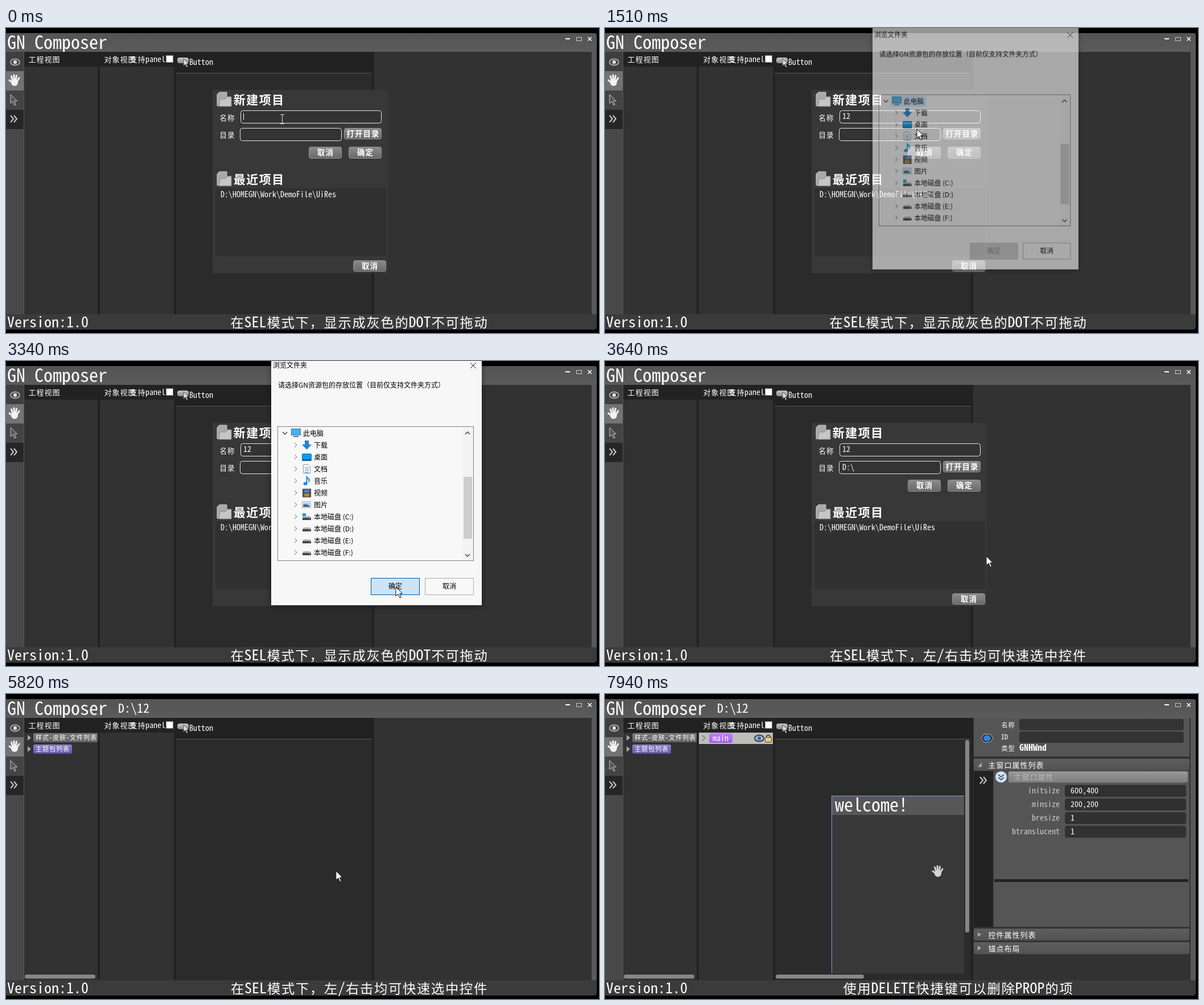
An HTML page with a canvas for the animation above (8 s loop, 1042 by 537 pixels).

```html
<!DOCTYPE html>
<html lang="zh">
<head>
<meta charset="utf-8">
<title>GN Composer</title>
<style>
html, body { margin: 0; width: 100%; height: 100%; overflow: hidden; background: #000; }
canvas { display: block; }
</style>
</head>
<body>
<canvas id="stage" width="1042" height="537"></canvas>
<script>
const W = 1042, H = 537, LOOP = 8000;
const SANS = '"Noto Sans CJK SC", "Noto Sans CJK JP", sans-serif';
const MONO = '"Noto Sans Mono CJK SC", "Noto Sans Mono CJK JP", "Liberation Mono", monospace';
const main = document.getElementById('stage').getContext('2d');
const layer = document.createElement('canvas');
const LIFT = 20; // part of the folder window above the stage
layer.width = W;
layer.height = H + LIFT;
let g = main, now = 0, mouse = null;

main.font = '100px ' + MONO;
const advance = main.measureText('0').width / 100;

// The screen updates in steps: [start, interval, count]
const ticks = [
  [0, 0, 1], [140, 0, 1], [420, 0, 1], [700, 135, 7], [1630, 0, 1],
  [1750, 132.85, 8], [2800, 135, 5], [3490, 150, 3], [3940, 135, 7], [4900, 0, 1],
  [5050, 148.57, 8], [6560, 150, 3], [7140, 133.33, 7]
].flatMap(([start, gap, n]) => Array.from({ length: n }, (_, i) => Math.floor(start + i * gap)));

// Pointer path: time, x, y
const path = [
  [700, 490, 163], [970, 600, 184], [1105, 624, 188], [1240, 624, 188], [1375, 605, 184],
  [1510, 548, 178], [1630, 515, 178], [1750, 502, 178], [1950, 510, 200], [2281, 560, 293],
  [2800, 568, 299], [3205, 682, 396], [3340, 685, 398], [3490, 685, 398], [3940, 640, 235],
  [4075, 630, 225], [4900, 630, 225], [5500, 582, 314], [5790, 580, 312], [6090, 556, 245],
  [6860, 556, 245], [7140, 560, 258], [7400, 580, 308], [7930, 585, 313]
];

function pointerAt(t) {
  if (t < 140) return { x: 485, y: 160 };
  if (t < 700) return null;
  const i = path.findIndex(k => k[0] > t);
  if (i < 0) return { x: 585, y: 313 };
  const [t0, x0, y0] = path[i - 1], [t1, x1, y1] = path[i];
  const p = (t - t0) / (t1 - t0);
  return { x: x0 + (x1 - x0) * p, y: y0 + (y1 - y0) * p };
}

const inside = (x, y, w, h) =>
  mouse && mouse.x >= x && mouse.x < x + w && mouse.y >= y && mouse.y < y + h;

function rect(x, y, w, h, fill) {
  g.fillStyle = fill;
  g.fillRect(x, y, w, h);
}

function round(x, y, w, h, r, fill, stroke) {
  g.beginPath();
  g.roundRect(x, y, w, h, r);
  if (fill) { g.fillStyle = fill; g.fill(); }
  if (stroke) { g.strokeStyle = stroke; g.lineWidth = 1; g.stroke(); }
}

function line(points, color, width = 1) {
  g.beginPath();
  points.forEach(([x, y]) => g.lineTo(x, y));
  g.strokeStyle = color;
  g.lineWidth = width;
  g.stroke();
}

function poly(points, fill, stroke) {
  g.beginPath();
  points.forEach(([x, y]) => g.lineTo(x, y));
  g.closePath();
  if (fill) { g.fillStyle = fill; g.fill(); }
  if (stroke) { g.strokeStyle = stroke; g.lineWidth = 1; g.stroke(); }
}

function oval(x, y, rx, ry, fill, stroke, width = 1) {
  g.beginPath();
  g.ellipse(x, y, rx, ry, 0, 0, Math.PI * 2);
  if (fill) { g.fillStyle = fill; g.fill(); }
  if (stroke) { g.strokeStyle = stroke; g.lineWidth = width; g.stroke(); }
}

function shade(y, h, top, bottom) {
  const s = g.createLinearGradient(0, y, 0, y + h);
  s.addColorStop(0, top);
  s.addColorStop(1, bottom);
  return s;
}

// Half-width Latin next to full-width Chinese; align: 0 left, .5 centre, 1 right
function put(str, x, y, size, color = '#fff', align = 0, weight = 400) {
  const half = Math.ceil(size / 2);
  const runs = str.match(/[\x20-\x7e]+|[^\x20-\x7e]+/g).map(s => {
    const latin = s.charCodeAt(0) < 127;
    return { s, latin, w: s.length * (latin ? half : size) };
  });
  x -= align * runs.reduce((sum, r) => sum + r.w, 0);
  g.fillStyle = color;
  for (const r of runs) {
    // Chinese glyphs sit in their cell with a little air
    const air = r.latin ? 0 : size * .07;
    g.font = `${weight} ${r.latin ? half / advance : size - air}px ${r.latin ? MONO : SANS}`;
    g.letterSpacing = air + 'px';
    g.fillText(r.s, x + air / 2, y);
    x += r.w;
  }
  g.letterSpacing = '0px';
}

function label(str, x, y, color = '#000', align = 'left') {
  g.font = '12px ' + SANS;
  g.textAlign = align;
  g.fillStyle = color;
  g.fillText(str, x, y);
  g.textAlign = 'left';
}

function button(str, x, y, w, h, size = 14.5) {
  const hot = inside(x, y, w, h);
  round(x + .5, y + .5, w - 1, h - 1, 3, shade(y, h, hot ? '#a2a2a2' : '#8c8c8c', hot ? '#808080' : '#686868'), '#909090');
  put(str, x + w / 2, y + h / 2 + size * .34, size, '#fff', .5, 700);
}

function arrow(x, y, fill, stroke, k = 1) {
  const shape = [[0, 0], [0, 16], [4, 12.5], [7, 19], [9.5, 18], [6.5, 11.5], [11.5, 11.5]];
  poly(shape.map(([a, b]) => [x + a * k, y + b * k]), fill, stroke);
}

function hand(x, y, color) {
  g.lineCap = 'round';
  for (const [a, b] of [[-9, 0], [-5.5, -7], [-1, -9], [3.5, -8], [8, -4]])
    line([[x + a * .4, y + 4], [x + a, y + b]], color, 3);
  g.lineCap = 'butt';
  oval(x, y + 4, 6, 6, color);
}

function eye(x, y, color, pupil) {
  oval(x, y, 8, 5.5, null, color, 2);
  oval(x, y, 3.2, 3.2, pupil);
}

function chevrons(x, y, color) {
  for (const d of [-5, 1]) line([[x + d, y - 6], [x + d + 5, y], [x + d, y + 6]], color, 2);
}

function folder(x, y) {
  poly([[x, y + 4], [x + 4, y], [x + 17, y], [x + 17, y + 24], [x, y + 24]], '#a9a9a9', '#ccc');
  poly([[x + 5, y + 12], [x + 15, y + 12], [x + 18, y + 8], [x + 25, y + 8], [x + 25, y + 25], [x + 3, y + 25]], '#c6c6c6', '#8b8b8b');
}

function frame() {
  rect(0, 0, W, H, '#000');
  round(0, 9, 1038, 522, [0, 4, 5, 0], '#323232');
  round(0, 9, 1038, 33, [0, 4, 0, 0], shade(9, 33, '#545454', '#5b5b5b'));
  rect(1029, 42, 9, 462, '#595959');
  round(0, 504, 1038, 27, [0, 0, 5, 0], '#3b3b3b');
  put('GN Composer', 2, 37, 32);
  if (now >= 5790) put('D:\\12', 197, 33, 22);
  rect(983, 18, 8, 2, '#fff');
  g.strokeStyle = '#c8c8c8';
  g.lineWidth = 1;
  g.strokeRect(1002.5, 16.5, 9, 6);
  line([[1022.5, 16], [1029, 22.5]], '#fff', 1.5);
  line([[1029, 16], [1022.5, 22.5]], '#fff', 1.5);

  rect(0, 42, 32, 462, '#484848');
  rect(0, 42, 31, 34, '#3f3f3f');
  rect(0, 76, 31, 34, '#737373');
  rect(0, 110, 31, 34, '#444');
  rect(0, 144, 31, 34, '#262626');
  rect(31, 42, 1, 462, '#585858');
  eye(16, 60, '#aaa', '#ddd');
  hand(15, 92, '#f2f2f2');
  arrow(8, 117, '#555', '#c4c4c4');
  chevrons(13, 160, '#c8c8c8');

  rect(32, 42, 614, 26, '#222');
  for (const x of [161, 295, 643]) rect(x, 42, 4, 462, '#222');
  rect(299, 42, 347, 37, '#222');
  rect(299, 79, 344, 1, '#585858');
  rect(299, 80, 344, 424, '#2b2b2b');
  put('工程视图', 39, 60, 14);
  put('对象视图', 172, 60, 14);
  put('支持panel', 217, 60, 14);
  rect(281, 48, 13, 13, '#888');
  rect(282, 49, 11, 11, '#fff');
  round(301, 52, 20, 10, 4, shade(52, 10, '#c4c4c4', '#8e8e8e'));
  arrow(312, 54, '#ddd', '#555', .78);
  put('Button', 322, 65, 14);

  put('Version:1.0', 2, 527, 25);
  const tip = now < 3640 ? '在SEL模式下，显示成灰色的DOT不可拖动'
    : now < 7670 ? '在SEL模式下，左/右击均可快速选中控件'
    : '使用DELETE快捷键可以删除PROP的项';
  put(tip, 620, 527, 25, '#fff', .5);
}

function startPanel() {
  rect(363, 109, 308, 323, '#383838');
  folder(371, 113);
  put('新建项目', 399, 133.5, 22.5, '#fff', 0, 700);
  put('名称', 375, 163, 13.5);
  put('目录', 375, 193, 13.5);
  round(412.5, 145.5, 247, 22, 4, '#333', '#e6e6e6');
  round(411.5, 176.5, 178, 22, 4, '#333', '#e6e6e6');
  const typed = now < 140 ? '' : now < 420 ? '1' : '12';
  if (typed) put(typed, 417, 160, 14);
  if (now < 1240) rect(417 + typed.length * 7, 150, 1, 12, '#fff');
  if (now >= 3640) put('D:\\', 417, 192, 14);
  button('打开目录', 594, 176, 66, 20);
  button('取消', 532, 209, 58, 21);
  button('确定', 602, 209, 58, 21);
  folder(371, 253);
  put('最近项目', 399, 274, 22.5, '#fff', 0, 700);
  rect(368, 282, 300, 120, '#313131');
  put('D:\\HOMEGN\\Work\\DemoFile\\UiRes', 377, 298, 14);
  button('取消', 610, 409, 58, 20);
}

const drive = y => {
  poly([[523, y], [534, y], [536, y + 3], [521, y + 3]], '#b5b5b5');
  rect(521, y + 3, 15, 4, '#444');
  rect(532, y + 4, 2, 1, '#7ee07e');
};

const icons = [
  y => poly([[525, y - 8], [532, y - 8], [532, y - 1], [537, y - 1], [528.5, y + 8], [520, y - 1], [525, y - 1]], '#2183d6'),
  y => { round(520.5, y - 5.5, 16, 12, 1, '#0b9af0', '#0a69ad'); rect(521, y + 4, 15, 2, '#1c5d91'); },
  y => {
    poly([[522.5, y - 7.5], [531, y - 7.5], [534.5, y - 4], [534.5, y + 7.5], [522.5, y + 7.5]], '#fff', '#8a949c');
    for (let i = 0; i < 4; i++) rect(525, y - 3 + i * 3, 7, 1, '#3f8fc6');
  },
  y => {
    line([[528.5, y + 5], [528.5, y - 7], [533, y - 2], [532, y + 2]], '#1588dc', 2);
    oval(526, y + 5, 3.5, 2.8, '#1588dc');
  },
  y => {
    rect(521, y - 7, 15, 15, '#333');
    for (let i = 0; i < 5; i++) { rect(522, y - 6 + i * 3, 1, 1, '#eee'); rect(534, y - 6 + i * 3, 1, 1, '#eee'); }
    rect(524, y - 6, 9, 6, '#4f7fc0');
    rect(524, y + 1, 9, 6, '#a7824c');
  },
  y => {
    round(520.5, y - 5.5, 15, 11, 0, '#fff', '#a0a8ae');
    rect(522, y - 4, 12, 8, '#a9d3ee');
    poly([[522, y + 4], [522, y], [527, y - 1], [534, y + 2], [534, y + 4]], '#39678d');
  },
  y => { rect(521, y - 6, 6, 6, '#18a0e8'); drive(y - 1); },
  y => drive(y - 2), y => drive(y - 2), y => drive(y - 2)
];
const places = ['下载', '桌面', '文档', '音乐', '视频', '图片', ...[...'CDEF'].map(c => `本地磁盘 (${c}:)`)];

function winButton(str, x, state) {
  const [fill, edge, ink] = {
    off: ['#ccc', '#bfbfbf', '#838383'],
    on: ['#f8f8f8', '#adadad', '#000'],
    hot: ['#cce4f7', '#005499', '#000']
  }[state];
  rect(x, 382, 86, 30, edge);
  rect(x + 1, 383, 84, 28, fill);
  label(str, x + 43, 401, ink, 'center');
}

function browser() {
  rect(466, -LIFT, 370, 430 + LIFT, '#f7f7f7');
  label('浏览文件夹', 469, 12);
  line([[816, 3], [826, 13]], '#222');
  line([[826, 3], [816, 13]], '#222');
  label('请选择GN资源包的存放位置（目前仅支持文件夹方式）', 478, 47);
  rect(477, 115, 345, 237, '#828282');
  rect(478, 116, 343, 235, '#f8f8f8');
  rect(803, 116, 18, 235, '#f3f3f3');
  rect(804, 204, 15, 109, '#cdcdcd');
  line([[807, 129], [811, 125], [815, 129]], '#505050', 1.7);
  line([[807, 340], [811, 344], [815, 340]], '#505050', 1.7);

  if (now < 2410) rect(499, 117, 63, 20, '#cce8ff');
  else if (now < 3340) rect(519, 285, 97, 20, '#cce8ff');
  line([[486, 125], [490, 129], [494, 125]], '#404040', 1.5);
  round(501.5, 119.5, 16, 11, 0, '#43b4ee', '#39749b');
  rect(505, 132, 9, 2, '#5a7f97');
  label('此电脑', 522, 131.5);
  places.forEach((name, i) => {
    const y = 148 + i * 21;
    line([[507, y - 4], [511, y], [507, y + 4]], '#a6a6a6', 1.4);
    icons[i](y);
    label(name, 541, y + 4.5);
  });
  winButton('确定', 641, now < 2410 ? 'off' : inside(641, 382, 86, 30) ? 'hot' : 'on');
  winButton('取消', 736, inside(736, 382, 86, 30) ? 'hot' : 'on');
}

// Opens and closes with a fade and a slight zoom
function showBrowser() {
  if (now < 1375 || now >= 3640) return;
  const [alpha, zoom] = now < 1510 ? [.2, .95] : now < 1630 ? [.6, .978]
    : now < 1750 ? [.93, .996] : now < 3490 ? [1, 1] : [.45, .965];
  g = layer.getContext('2d');
  g.clearRect(0, 0, W, layer.height);
  g.save();
  g.translate(0, LIFT);
  browser();
  g.restore();
  g = main;
  g.save();
  g.translate(650.5, 205);
  g.scale(zoom, zoom);
  g.translate(-650.5, -205);
  g.globalAlpha = alpha;
  g.save();
  // Shadow only around the window, so it does not darken what shows through
  g.beginPath();
  g.rect(-W, -H, 3 * W, 3 * H);
  g.rect(466, -LIFT, 370, 430 + LIFT);
  g.clip('evenodd');
  g.shadowColor = 'rgba(0,0,0,.45)';
  g.shadowBlur = 10;
  g.shadowOffsetY = 2;
  rect(466, -LIFT, 370, 430 + LIFT, '#000');
  g.restore();
  g.drawImage(layer, 0, -LIFT);
  g.restore();
}

function tag(str, x, y, w, h, top, bottom, size) {
  round(x, y, w, h, 3, shade(y, h, top, bottom));
  put(str, x + (size > 12 ? 6 : 3.5), y + h / 2 + size * .37, size);
}

function tree() {
  for (const y of [77, 97]) poly([[38, y - 5], [44, y], [38, y + 5]], '#a8a8a8');
  g.save();
  g.beginPath();
  g.rect(32, 68, 129, 430);
  g.clip();
  tag('样式-皮肤-文件列表', 48, 69, 118, 16, '#7a7a7a', '#626262', 12);
  g.restore();
  tag('主题包列表', 48, 89, 68, 16, '#8f80cc', '#6656a6', 12);
  round(33, 494, 124, 7, 3.5, '#868686');
}

function message(str) {
  round(343, 216, 348, 108, 4, '#383838');
  round(343, 216, 348, 24, [4, 4, 0, 0], '#ee0000');
  rect(670, 217, 21, 16, '#555');
  line([[676.5, 222.5], [682, 228]], '#fff', 1.5);
  line([[682, 222.5], [676.5, 228]], '#fff', 1.5);
  put('MSG', 347, 236, 22);
  put(str, 345, 256, 14);
  button('确定', 553, 302, 59, 21, 15);
  button('取消', 617, 302, 59, 21, 15);
}

function objectRow() {
  rect(165, 68, 130, 20, '#bdbdb9');
  line([[171, 73], [176, 77.5], [171, 82]], '#777', 1.3);
  tag('main', 183, 69, 41, 17, '#c383f2', '#a45fe0', 14);
  eye(271, 78, '#26364f', '#2d6cb5');
  g.beginPath();
  g.arc(287, 76, 3.5, Math.PI, 0);
  g.strokeStyle = '#333';
  g.lineWidth = 1.6;
  g.stroke();
  round(281.5, 76.5, 11, 8, 1, '#ecd27a', '#4a4020');
}

function preview() {
  rect(398, 179, 233, 313, '#383838');
  rect(398, 179, 233, 34, '#575757');
  rect(398, 179, 233, 1, '#7aa0ea');
  rect(398, 179, 1, 313, '#7aa0ea');
  put('welcome!', 404, 207, 32);
  round(633, 81, 7, 339, 3.5, '#868686');
  round(300, 494, 155, 7, 3.5, '#868686');
}

function section(str, y, open) {
  round(648, y, 379, 21, 2, shade(y, 21, '#5e5e5e', '#525252'));
  const c = y + 10.5;
  poly(open ? [[662, c - 4], [662, c + 4], [655, c + 4]] : [[655, c - 4], [661, c], [655, c + 4]], '#aaa');
  put(str, 673, c + 5, 14);
}

function properties() {
  rect(648, 42, 379, 68, '#555');
  poly([[661, 78], [666, 71], [677, 71], [682, 78], [677, 85], [666, 85]], '#1d2633', '#b9c4d2');
  poly([[664, 78], [668, 73], [675, 73], [679, 78], [675, 83], [668, 83]], '#3b7fd4');
  put('名称', 696, 59, 12);
  put('ID', 696, 80, 12);
  put('类型', 696, 100, 12);
  round(728, 44, 289, 20, 4, '#333');
  round(728, 66, 289, 20, 4, '#333');
  put('GNHWnd', 728, 100, 16, '#fff', 0, 700);

  section('主窗口属性列表', 114, true);
  rect(648, 136, 379, 274, '#555');
  rect(648, 136, 34, 274, '#222');
  rect(682, 136, 2, 274, '#4a4a4a');
  chevrons(664, 152, '#c8c8c8');
  round(709, 136, 315, 20, 3, shade(136, 20, '#999', '#7c7c7c'));
  put('主窗口属性', 718, 151, 14, '#b8b8b8');
  oval(696, 146, 10, 10, '#dce3ea', '#8e98a4');
  for (const y of [142, 147]) line([[691, y], [696, y + 4], [701, y]], '#2f5f9e', 2);
  const rows = [['initsize', '600,400'], ['minsize', '200,200'], ['bresize', '1'], ['btranslucent', '1']];
  rows.forEach(([key, value], i) => {
    const y = 160 + i * 24;
    put(key, 799, y + 15, 14, '#ccc', 1);
    round(808, y, 213, 21, 4, '#313131');
    put(value, 818, y + 15, 14);
  });
  rect(684, 326, 341, 5, '#222');
  section('控件属性列表', 413);
  section('锚点布局', 437);
}

function cursor() {
  if (!mouse) return;
  const { x, y } = mouse;
  if (now >= 7670) {
    hand(x, y, '#333');
    hand(x, y - 1, '#d4d4d4');
  } else if (now < 1375 && y < 168 && x < 660) {
    rect(x, y - 7, 1, 15, '#ddd');
    rect(x - 3, y - 8, 7, 1, '#ddd');
    rect(x - 3, y + 8, 7, 1, '#ddd');
  } else {
    arrow(x, y, '#fff', '#111');
  }
}

function draw(time) {
  const t = time % LOOP;
  now = ticks.findLast(k => k <= t);
  mouse = pointerAt(now);
  frame();
  if (now < 4345) startPanel();
  else tree();
  showBrowser();
  if (now >= 4480 && now < 5640) message('是否进行完整性体检?');
  if (now >= 6560 && now < 7540) message('确认加载对象视图?');
  if (now >= 7670) {
    objectRow();
    preview();
  }
  if (now >= 7800) properties();
  cursor();
}

const start = performance.now();
(function tick() {
  draw(performance.now() - start);
  requestAnimationFrame(tick);
})();
</script>
</body>
</html>
```
